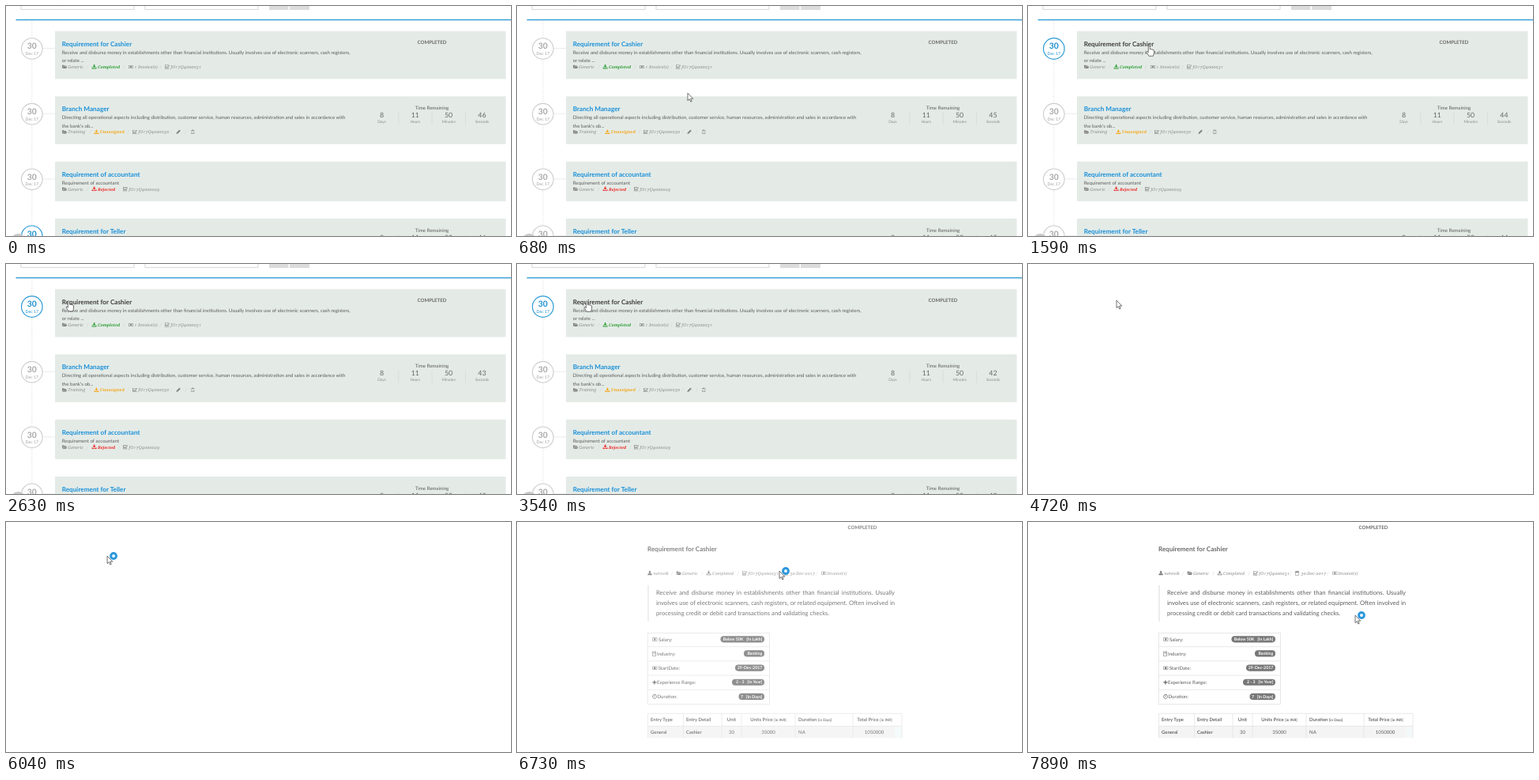
These frames come from a looping animation (639x291 px, 8000 ms). An HTML page:

```html
<!DOCTYPE html>
<html lang="en">
<head>
<meta charset="utf-8">
<title>Job requirements</title>
<style>
  html, body { margin: 0; width: 100%; height: 100%; overflow: hidden; background: #fff; }
  svg { position: absolute; left: 0; top: 0; }
  text, .quote { font: 6.1px Lato, sans-serif; fill: #5c5c5c; text-rendering: geometricPrecision; white-space: pre; }
  .title { font-size: 8.2px; font-weight: 700; fill: #1b90d8; }
  .title.hot { fill: #3c3c3c; }
  .heading { font-size: 8.15px; font-weight: 700; fill: #6a6a6a; }
  .status { font-weight: 700; fill: #666; }
  .meta { font: italic 5.5px "Noto Serif", serif; font-variant-numeric: oldstyle-nums; fill: #8c8c8c; }
  .bold { font-weight: 700; }
  .meta.bold { font-size: 5.25px; }
  .slash { fill: #c4c4c4; }
  .count { font-size: 8.75px; fill: #666; }
  .unit { font-size: 4.81px; fill: #888; }
  .day { font-size: 10.4px; font-weight: 700; fill: #a8a8a8; }
  .month { font-size: 5.25px; fill: #a0a0a0; }
  .badge circle { fill: #fff; stroke: #ccc; stroke-width: 1.1; }
  .badge path { stroke: #e4e8e6; stroke-width: .8; }
  .badge.hot circle { stroke: #2b9ad6; stroke-width: 1.2; }
  .badge.hot path { stroke: none; }
  .badge.hot text { fill: #1b8fd0; }
  .pill { font-size: 5.25px; font-weight: 700; fill: #fff; }
  .th { font-size: 5.95px; font-weight: 600; fill: #555; }
  .small { font-size: 4.6px; }
  .mid { text-anchor: middle; }
  .end { text-anchor: end; }
  .quote { position: absolute; left: 176px; top: 83px; width: 302px; font-size: 7.66px; line-height: 13.2px; color: #5c5c5c; white-space: normal; }
  .quote div { text-align-last: justify; }
  .quote div:last-child { text-align-last: left; }
</style>
</head>
<body>
<svg id="list" width="639" height="291"></svg>
<div id="detail">
  <svg id="sheet" width="639" height="291"></svg>
  <div class="quote">
    <div>Receive and disburse money in establishments other than financial institutions. Usually</div>
    <div>involves use of electronic scanners, cash registers, or related equipment. Often involved in</div>
    <div>processing credit or debit card transactions and validating checks.</div>
  </div>
</div>
<svg width="639" height="291">
  <g id="pointer" stroke="#444" stroke-width=".75" fill="#fff" stroke-linejoin="round">
    <path id="arrow" d="M0 0V9.6L2.2 7.6 3.8 11 5.2 10.4 3.7 7.1H6.8Z"/>
    <circle id="busy" cx="8" cy="0" r="3.4" stroke="#2b97dc" stroke-width="3"/>
    <path id="hand" d="M-1.6 1.2Q-.6 0 .4 1.2V5.2L2.4 5.3 4.2 5.8 5.6 6.6V10.2L4.6 13.8H-.8L-3.8 9.2Q-4 7.6-2.8 7.9L-1.6 9.2Z"/>
  </g>
</svg>
<script>
const LOOP = 8000;
const $ = id => document.getElementById(id);

const ICONS = {
  folder: 'M0 .8h2.2l.6.7h2.4v1H1.6L.3 5H0zM1.9 2.9H6.3L5.2 5.2H.7z',
  download: 'M2.2 0h1.4v2h1.5L2.9 4 .8 2h1.4zM0 3.5h1v1.2h3.8V3.5h1v2H0z',
  money: 'M0 1h6v4H0zM.5 1.5v3h5v-3zM3 1.8a1.2 1.2 0 1 0 .01 0z',
  check: 'M0 .5h4.5v.6H.6v4h3.9V3.5h.6v2.2H0zM1.3 2.5l1.2 1.2L5.6.6l.6.6-3.7 3.7L.7 3.1z',
  pencil: 'M0 5.5l.4-1.8L4 .2l1.4 1.4-3.6 3.5z',
  trash: 'M0 1h1.6l.3-.8h1.4l.3.8h1.6v.6H0zM.6 2h4v3.7h-4zM1.1 2.1v3.1h3V2.1zM2.4 2.6h.4v2.2h-.4z',
  user: 'M2.8 0a1.4 1.5 0 1 0 .01 0zM0 5.5c0-2 1-2.5 2.8-2.5s2.8.5 2.8 2.5z',
  calendar: 'M0 .7h5v5H0zM.5 2.2v3h4v-3zM1 0h.8v.7H1zM3.2 0h.8v.7h-.8z',
  building: 'M0 0h4.6v6H0zM.5.5v5h3.6v-5zM1.2 1.2h.8V2h-.8zM2.7 1.2h.8V2h-.8zM1.2 2.8h.8v.8h-.8zM2.7 2.8h.8v.8h-.8z',
  plus: 'M2 .5h1.3v1.8h1.9v1.3H3.3v1.9H2V3.6H.1V2.3H2z',
  clock: 'M2.8 0a2.8 2.8 0 1 0 .01 0zM2.8.7a2.1 2.1 0 1 1-.01 0zM2.5 1.4h.6v1.8H1.6v-.6h.9z'
};

const text = (x, y, str, cls = '', fill = '') =>
  `<text x="${x}" y="${y}" class="${cls}"${fill && ` style="fill:${fill}"`}>${str}</text>`;
const rect = (x, y, w, h, fill, more = '') =>
  `<rect x="${x}" y="${y}" width="${w}" height="${h}" fill="${fill}" ${more}/>`;
const line = (d, stroke, more = '') => `<path d="${d}" fill="none" stroke="${stroke}" ${more}/>`;
const icon = (name, x, y, fill = '#858585') =>
  `<path d="${ICONS[name]}" transform="translate(${x} ${y})" fill="${fill}" fill-rule="evenodd"/>`;

// Items: [x, icon, label, accent colour]; slashes: their x positions.
const meta = (y, items, slashes) =>
  items.map(([x, name, label = '', accent]) =>
    icon(name, x, y - 4.9, accent) +
    text(x + 7.3, y, label, accent ? 'meta bold' : 'meta', accent)).join('') +
  slashes.map(x => text(x, y, '/', 'meta slash mid')).join('');

const ROWS = [
  { y: 31.8, h: 60.6, badge: 54, title: 'Requirement for Cashier', done: true,
    body: ['Receive and disburse money in establishments other than financial institutions. Usually involves use of electronic scanners, cash registers,', 'or relate ...'],
    items: [[71, 'folder', 'Generic'], [108.7, 'download', 'Completed', '#2f9e36'], [155, 'money', '1 Invoice(s)'], [201, 'check', 'JO17Q4000031']],
    slashes: [103, 149, 195.5] },
  { y: 114.3, h: 60.5, badge: 136.7, title: 'Branch Manager', timer: true,
    body: ['Directing all operational aspects including distribution, customer service, human resources, administration and sales in accordance with', 'the bank\'s ob...'],
    items: [[71, 'folder', 'Training'], [111.5, 'download', 'Unassigned', '#f5a71c'], [160, 'check', 'JO17Q4000030'], [215.5, 'pencil'], [233.7, 'trash']],
    slashes: [106.5, 154.5, 209.5, 227.5] },
  { y: 196.8, h: 50.2, badge: 219.3, title: 'Requirement of accountant',
    body: ['Requirement of accountant'],
    items: [[71, 'folder', 'Generic'], [108.7, 'download', 'Rejected', '#ee2b2b'], [148, 'check', 'JO17Q4000029']],
    slashes: [103, 143] },
  { y: 269, h: 60, badge: 291.3, title: 'Requirement for Teller', timer: true, body: [], items: [], slashes: [] }
];

function timer(y) {
  const parts = [['8', 'Days'], ['11', 'Hours'], ['50', 'Minutes'], ['46', 'Seconds']];
  return text(539, y + 17, 'Time Remaining', 'mid') + parts.map(([n, unit], i) => {
    const x = 475.5 + i * 42.3;
    return text(x, y + 26.8, n, 'count mid' + (i === 3 ? ' seconds' : '')) +
      text(x, y + 33.7, unit, 'unit mid') +
      (i ? line(`M${x - 21} ${y + 20}v16`, '#d3dad6', 'stroke-width=".7"') : '');
  }).join('');
}

function row(r) {
  const metaY = r.y + 36.7 + (r.body.length - 1) * 10.3;
  return `<g class="badge"><path d="M46 ${r.badge - .5}H62"/><circle cx="32.8" cy="${r.badge}" r="13.3"/>` +
    text(32.8, r.badge + .3, '30', 'day mid') + text(32.8, r.badge + 7.9, 'Dec 17', 'month mid') + '</g>' +
    rect(62, r.y, 570.5, r.h, '#e4ebe7') +
    text(70.7, r.y + 18.9, r.title, 'title') +
    r.body.map((str, i) => text(70.7, r.y + 29.1 + i * 10.5, str)).join('') +
    meta(metaY, r.items, r.slashes) +
    (r.done ? text(539, r.y + 16.3, 'COMPLETED', 'status mid') : '') +
    (r.timer ? timer(r.y) : '');
}

$('list').innerHTML =
  [19, 176].map(x => rect(x, -10, 143, 14.3, '#fff', 'stroke="#ccc" stroke-width=".8"')).join('') +
  text(68, -.8, 'yp') +
  rect(333, -5, 24.5, 10, '#dcdcdc') + rect(359, -5, 25, 10, '#dcdcdc') +
  line('M12.5 17.5H639', '#3a9fd6', 'stroke-width="1.7"') +
  line('M32.8 18V291', '#dcdcdc', 'stroke-width=".8" stroke-dasharray="1.5 1.5"') +
  ROWS.map(row).join('') +
  '<circle cx="15.5" cy="298" r="10" fill="#c9c9c9"/>';

const FACTS = [
  ['money', 179, 'Salary:', 'Below 50K   [In Lakh]', 55.5],
  ['building', 177, 'Industry:', 'Banking', 26],
  ['money', 178.7, 'StartDate:', '29-Dec-2017', 37],
  ['plus', 177, 'Experience Range:', '2 - 3   [In Year]', 41],
  ['clock', 177.5, 'Duration:', '7   [In Days]', 32.5]
];
const fact = ([name, x, label, value, width], i) => {
  const y = 148.3 + i * 18.15;
  return icon(name, 171.3, y - 2.8, '#666') + text(x, y + 2.5, label) +
    rect(313 - width, y - 4.1, width, 8.2, '#777', 'rx="4.1"') +
    text(310.3, y + 1.7, value, 'pill end') +
    (i ? line(`M165.5 ${y - 8.7}H319.5`, '#e2e2e2', 'stroke-width=".8"') : '');
};
const small = str => ` <tspan class="small">${str}</tspan>`;

$('sheet').innerHTML =
  text(437, 8.7, 'COMPLETED', 'status mid') +
  text(165, 36.6, 'Requirement for Cashier', 'heading') +
  meta(66.6, [[165.3, 'user', 'nerovik'], [201.7, 'folder', 'Generic'], [239.7, 'download', 'Completed'],
    [285, 'check', 'JO17Q4000031'], [338, 'calendar', '30-Dec-2017'], [385.3, 'money', 'Invoice(s)']],
    [196, 234.5, 279.5, 332.5, 379]) +
  rect(165, 80, 2, 46, '#ececec') +
  rect(165.5, 140.5, 154, 90, '#fff', 'stroke="#e2e2e2" stroke-width=".8"') +
  FACTS.map(fact).join('') +
  rect(165.5, 258, 321.5, 15.3, '#f4f4f4') + rect(478, 259, 9, 14, '#f3f9f9') +
  line('M165.5 273V242.3H487V273M165.5 258.3H487' + [210.5, 259, 284, 352, 425].map(x => `M${x} 242.3V273`).join(''),
    '#e4e4e4', 'stroke-width=".8"') +
  text(169, 252.2, 'Entry Type', 'th') + text(214, 252.2, 'Entry Detail', 'th') +
  text(271.5, 252.2, 'Unit', 'th mid') +
  text(318, 252.2, 'Units Price' + small('[in INR]'), 'th mid') +
  text(356, 252.2, 'Duration' + small('[in Days]'), 'th') +
  text(452.5, 252.2, 'Total Price' + small('[in INR]'), 'th mid') +
  text(169, 268.2, 'General', 'th bold') + text(214, 268.2, 'Cashier', 'th bold') +
  text(271.5, 268.2, '30', 'mid') + text(318, 268.2, '35000', 'mid') +
  text(356, 268.2, 'NA') + text(452, 268.2, '1050000', 'mid');

// [time, x, y] of the pointer tip.
const PATH = [
  [0, 354, 296], [20, 353, 291], [150, 345, 262], [290, 318, 215], [500, 258, 150], [750, 200, 95],
  [1070, 163, 52], [1590, 154, 49.5], [1750, 130, 48], [1980, 89, 46], [2110, 80, 46], [2900, 80, 46],
  [3250, 76, 46], [3540, 89, 46.5], [4060, 100, 46.5], [4450, 112, 46], [5000, 112, 46],
  [5250, 120, 46.5], [5510, 121, 47], [5900, 127, 44], [6040, 128, 43], [6180, 140, 41],
  [6320, 156, 46], [6460, 205, 52], [6590, 265, 58], [6730, 332, 62], [7100, 330, 58],
  [7500, 320, 45], [7630, 350, 70], [7890, 414, 118], [8000, 414, 118]
];
const FADE = [[6300, 0], [6320, .3], [6730, .82], [7500, 1], [8000, 1]];
const PAGE_GONE = 4700, BUSY_FROM = 5510, CLICKED = 4500;

function sample(track, t) {
  const i = track.findIndex(key => key[0] > t);
  if (i === 0) return track[0].slice(1);
  const a = track[i - 1], b = track[i], k = (t - a[0]) / (b[0] - a[0]);
  return a.slice(1).map((v, j) => v + (b[j + 1] - v) * k);
}

const badges = [...document.querySelectorAll('.badge')];
const titles = [...document.querySelectorAll('.title')];
const seconds = [...document.querySelectorAll('.seconds')];
const show = (el, on) => { el.style.visibility = on ? 'visible' : 'hidden'; };

function render(t) {
  const [x, y] = sample(PATH, t);
  let overTitle = false;
  ROWS.forEach((r, i) => {
    const inside = y >= r.y && y < r.y + r.h;
    const onTitle = inside && x > 70 && x < 165 && y > r.y + 10 && y < r.y + 21;
    overTitle ||= onTitle;
    badges[i].classList.toggle('hot', inside);
    titles[i].classList.toggle('hot', onTitle);
  });
  const left = 46 - Math.floor((t + 580) / 1000);
  seconds.forEach(el => { el.textContent = left; });

  const hand = overTitle && t < CLICKED;
  $('pointer').setAttribute('transform', `translate(${x} ${y})`);
  show($('hand'), hand);
  show($('arrow'), !hand);
  show($('busy'), t >= BUSY_FROM);
  show($('list'), t < PAGE_GONE);
  $('detail').style.opacity = sample(FADE, t)[0];
}

const start = performance.now();
function tick() {
  render((performance.now() - start) % LOOP);
  requestAnimationFrame(tick);
}
tick();
</script>
</body>
</html>
```
